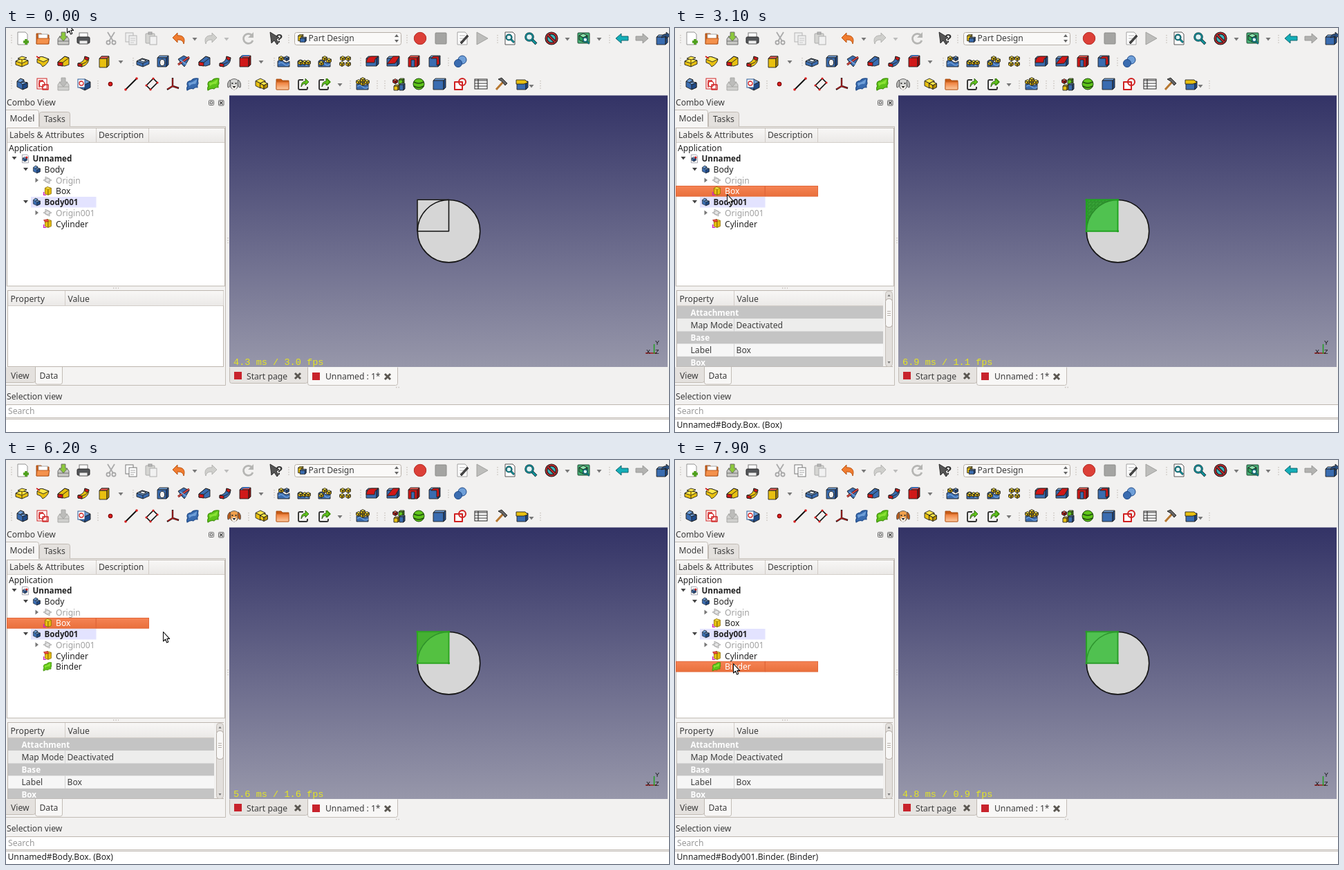
Recreate the animation shown at these times as an HTML page. Size 959 by 584 pixels, loop 8000 ms.

```html
<!DOCTYPE html>
<html lang="en">
<head>
<meta charset="utf-8">
<title>Shape binder</title>
<style>
html, body { margin: 0; width: 100%; height: 100%; overflow: hidden; background: #f2f1f0; }
svg { display: block; width: 959px; height: 584px; }
text { font: 12.15px "Noto Sans", "Open Sans", sans-serif; white-space: pre; }
.b { font-weight: 700; font-size: 11.65px; }
.fps { font: 13.6px "Liberation Mono", monospace; }
.axis { font: 9px "Liberation Sans", sans-serif; }
.q { font: 700 17px "Liberation Sans", sans-serif; }
</style>
</head>
<body>
<svg id="stage" viewBox="0 0 959 584"></svg>
<script>
const YEL = ['#ffe84a', '#e8c010', '#b48f00'];
const BLU = ['#6f9fd8', '#3a6cb0', '#1f4a88'];
const RED = ['#f05a50', '#d01818', '#980808'];
const GRN = ['#8ae234', '#5fc41a', '#3f9208'];
const INK = '#3c3c3c';

const path = (d, fill = 'none', stroke = '#222', w = .9) =>
  `<path d="${d}" fill="${fill}" stroke="${stroke}" stroke-width="${w}" stroke-linejoin="round"/>`;
const rect = (x, y, w, h, fill, stroke = 'none', r = 0) =>
  `<rect x="${x}" y="${y}" width="${w}" height="${h}" rx="${r}" fill="${fill}" stroke="${stroke}"/>`;
const disc = (x, y, r, fill, stroke = 'none', w = 1) =>
  `<circle cx="${x}" cy="${y}" r="${r}" fill="${fill}" stroke="${stroke}" stroke-width="${w}"/>`;
const text = (x, y, s, fill = INK, cls = '') =>
  `<text x="${x}" y="${y}" fill="${fill}" class="${cls}">${s.replace(/&/g, '&amp;')}</text>`;
const at = (x, y, art, k = 1) => `<g transform="translate(${x} ${y}) scale(${k})">${art}</g>`;
const down = (x, y, c = '#777') => path(`M${x - 3.5} ${y - 2}h7l-3.5 4.5z`, c, 'none');
const right = (x, y) => path(`M${x - 2} ${y - 3.5}v7l4.5 -3.5z`, '#777', 'none');
const dots = (x1, y1, x2, y2) =>
  `<path d="M${x1} ${y1}L${x2} ${y2}" stroke="#c2bcb6" stroke-width="1.4" stroke-dasharray="1.3 2.2"/>`;

// Icon pieces, drawn around 0,0
const block = ([a, b, c], x = 0, y = 0, w = 8, h = 8, d = 3) =>
  path(`M${x - w} ${y - h + d}L${x - w + d} ${y - h}H${x + w}L${x + w - d} ${y - h + d}z`, a) +
  path(`M${x - w} ${y - h + d}H${x + w - d}V${y + h}H${x - w}z`, b) +
  path(`M${x + w - d} ${y - h + d}L${x + w} ${y - h}V${y + h - d}L${x + w - d} ${y + h}z`, c);
const cube = ([a, b, c], x = 0, y = 0, r = 8) =>
  path(`M${x - r} ${y - r * .5}L${x} ${y - r}L${x + r} ${y - r * .5}L${x} ${y}z`, a) +
  path(`M${x - r} ${y - r * .5}L${x} ${y}V${y + r}L${x - r} ${y + r * .5}z`, b) +
  path(`M${x + r} ${y - r * .5}L${x} ${y}V${y + r}L${x + r} ${y + r * .5}z`, c);
const body = path('M-7 -4L-2 -8L3 -6V-3L8 -2V5L1 8L-7 4z', BLU[1]) + path('M-7 -4L-2 -8L3 -6L-2 -2z', BLU[0]) +
  path('M-2 -2L3 -3L8 -2L1 1z', BLU[0]) + path('M1 1L8 -2V5L1 8z', BLU[2]);
const slab = (c) => path('M-9 0L-1 -4L9 -1V4L0 8L-9 5z', c[1]) + path('M-9 0L-1 -4L9 -1L0 3z', c[0]) + path('M0 3V8');
const pad = slab(YEL) + path('M-6 -4L0 -7L7 -5L1 -2z', YEL[0]) + path('M0 -2V2', 'none', '#b48f00', 2);
const revolve = path('M-8 -3Q-4 -8 1 -6L9 -3Q8 4 0 8Q-2 3 -8 2z', YEL[1]) + path('M-8 -3Q-4 -8 1 -6L9 -3L1 1z', YEL[0]) +
  path('M-9 -7L-4 -4', 'none', RED[1], 1.6);
const wedge = (c, face) =>
  path('M-8 1L2 -7L8 -5V5L2 7L-8 6z', c[1]) + path('M-8 1L-1 2V7L-8 6z', face[1]) + path('M-1 2L8 -5M-8 1L2 -7L8 -5', 'none');
const sweep = (c, face) => path('M-8 3Q1 2 2 -7L8 -5Q8 5 -2 8L-8 7z', c[1]) + path('M-8 3L-2 4V8L-8 7z', face[1]) +
  path('M2 -7L8 -5L6 -1L2 -3z', face[1]) + path('M-2 4Q5 2 6 -1', 'none');
const page = (fill = '#fff', stroke = '#888') => path('M-7 -9H4L7 -6V9H-7z', fill, stroke);
const cover = 'M-9 -7H-2L0 -5H9V8H-9z';
const folder = path(cover, '#c85a14', '#a34a10') + rect(-6, -6, 13, 8, '#fff', '#aaa') +
  path('M-8 0H10L8 8H-9z', '#f4914c', '#b85518');
const group = path(cover, '#c85a14', '#a34a10') + rect(-9, -3, 18, 11, 'url(#file)', '#c8682a', 1);
const lens = (c = '#0fa0a8') => path('M2 2L8 8', 'none', '#143c44', 4) + path('M2 2L7.5 7.5', 'none', c, 2) +
  disc(-2, -2, 5.3, '#dff4f6', '#143c44', 3) + disc(-2, -2, 5.3, 'none', c, 1.3);
const curl = (c, s) => path('M-9 -1L-2 -8V-4C6 -5 10 0 7 8C6 3 3 2 -2 2V6z', c, s);
const tray = (c, s, arrow) => path('M-8 1L-6 -2H6L8 1V9H-8z', c, s) + path('M-8 4H8', 'none', s) +
  path('M-3 -9H3V-3H6L0 4L-6 -3H-3z', arrow, s);
const arrow = (c, s) => path('M-9 0L-1 -7V-3H9V3H-1V7z', c, s);
const wave = (c) => path('M-9 0Q-5 -4 -1 0T8 0V8H-9z', c[1]) + path('M-8 4Q-4 0 0 4T8 4', 'none', c[0], 1.4);
const bits = (c, ...spots) => spots.map(([x, y]) => cube(c, x, y, 3.4)).join('');
const blob = (c) => path('M-7 -3Q-4 -5 -2 -5Q1 -9 8 -8Q7 -4 8 -1Q6 2 7 5Q3 4 1 7Q-3 5 -8 9Q-9 5 -7 3Q-9 0 -7 -3z', c[1], c[2], 1.2) +
  path('M-6 -2Q-1 -1 6 -7Q6 -3 4 0Q-1 -1 -5 3z', c[0], 'none');
const dog = (c, ear) => path('M-6 -5Q0 -10 6 -5L5 5Q0 11 -5 5z', c, '#555') +
  path('M-6 -6Q-11 -2 -9 5Q-5 5 -5 -2zM6 -6Q11 -2 9 5Q5 5 5 -2z', ear, '#555') +
  path('M-4 4Q0 -1 4 4L2 8H-2z', '#f4f0ea', 'none') +
  disc(-2.5, -1, 1.1, '#222') + disc(2.5, -1, 1.1, '#222') + path('M-2.5 3H2.5L0 6z', '#222', 'none');
const sketch = (c) => rect(-8, -8, 14, 15, '#fff', c) + disc(-1, 0, 4, 'none', c, 1.4) +
  path('M-5 5V-5H1M0 1H8V8H0z', 'none', c, 1.4);
const share = path('M0 -6H-5Q-7 -6 -7 -4V6Q-7 8 -5 8H4Q6 8 6 6V4', 'none', '#333', 1.9) +
  path('M-3 4Q-3 -4 3 -4V-8L8 -3L3 2V-1Q-1 -1 -3 4z', GRN[1], '#2c5c14');
const copy = (on) => [[-8, -8], [-3, -4]].map(([x, y]) => rect(x, y, 11, 13, on ? '#fff' : '#eee', on ? '#777' : '#b5b5b5')).join('') +
  path('M-1 0H6M-1 3H6M-1 6H4', 'none', on ? '#999' : '#c4c4c4');
const origin = path('M-6 0L0 -3L6 0L0 3zM-3 -5L3 -2V5L-3 2z', '#e6e6e6', '#aaa');
const feature = path('M-4 -5L0 -7L6 -5V4L1 6L-4 4z', YEL[1], '#8a6a00') + path('M1 -3V6', 'none', '#5a4600') +
  path('M-6 1V6H-2', 'none', '#d020c0', 1.6) + path('M-4 -5L0 -7L6 -5L1 -3z', YEL[0], '#8a6a00', .7);
const cross = path('M-4 -4L4 4M4 -4L-4 4', 'none', '#5a5650', 3);

const row1 = [
  [24, page() + path('M5 1V9M1 5H9', 'none', '#4ea01c', 3.6)],
  [53, folder],
  [83, tray('#c9c9c5', '#666', '#8cc83c')],
  [112, rect(-6, -8, 12, 8, '#fff', '#777') + rect(-9, -2, 18, 9, '#55575a', '#222', 1.5) + rect(-6, 3, 12, 5, '#eee', '#555')],
  [152, path('M-5 -9L3 4M5 -9L-3 4', 'none', '#aaa', 1.8) + disc(-4, 6, 2.6, 'none', '#a5a5a5', 1.7) + disc(4, 6, 2.6, 'none', '#a5a5a5', 1.7)],
  [210, rect(-8, -7, 13, 14, '#d5d5d2', '#aaa', 1) + rect(-4, -9, 5, 3, '#bbb', '#999') + rect(-2, -3, 10, 12, '#f1f1f1', '#b0b0b0')],
  [250, curl('#f07c30', '#b8500c')],
  [296, `<g transform="scale(-1 1)">${curl('#cfcfcc', '#b0b0ae')}</g>`],
  [350, path('M6 -4A7 7 0 1 0 7 3', 'none', '#b5b5b3', 2.8) + path('M8 -9V-1H0z', '#b5b5b3', 'none')],
  [390, path('M-8 -9L-6 7L-2 3L2 9L4 7L1 1L5 -1z', '#555', '#222') + `<text x="0" y="6" class="q" fill="#333">?</text>`],
  [599, disc(0, 0, 8.7, '#dc4038', '#b52a24')],
  [629, rect(-8, -8, 16, 16, '#a4a4a2', '#8c8c8a', 1)],
  [660, page('#fff', '#999') + path('M-4 -4H4M-4 0H2M-4 4H1', 'none', '#aaa') + path('M-3 6L7 -5L9 -3L-1 8z', '#444', '#222', .7)],
  [688, path('M-7 -9L9 0L-7 9z', '#bdbdbb', '#9c9c9a')],
  [729, page('#fff', '#444') + at(0, 0, lens(), .75)],
  [759, lens()],
  [789, disc(0, 0, 7.6, '#3fb4bc', '#222', 4) + disc(0, 0, 7.6, 'none', '#c8282c', 1.6) + path('M-5 -5L5 5', 'none', '#222', 4) + path('M-5 -5L5 5', 'none', '#c8282c', 1.8)],
  [836, rect(-9, -8, 17, 15, '#49b078', '#1c4830', 1) + cube(['#8be4ac', '#2aa85c', '#177840'], -1, -1, 6) + at(3, 3, lens(), .6)],
  [891, arrow('#14aeb8', '#0b5c66')],
  [920, `<g transform="scale(-1 1)">${arrow('#b2b2b0', '#949492')}</g>`],
  [950, block(BLU, -1, 2, 8, 7) + path('M-2 -1Q0 -7 5 -6V-9L11 -4L5 0V-3z', '#2a4f80')]
];
const row2 = [
  [23, pad],
  [53, revolve],
  [83, wedge(YEL, RED)],
  [112, sweep(YEL, RED)],
  [142, block(YEL, 0, 1, 7, 8) + path('M-7 -4L-4 -7H7L4 -4z', RED[0])],
  [198, slab(BLU) + path('M-5 -1L-1 -3L5 -1L1 1z', '#e8f0fa')],
  [227, block(BLU) + `<ellipse cx="-1" cy="2" rx="3.6" ry="4.8" fill="#f2f1f0" stroke="#222"/>`],
  [257, path('M-8 -3L0 -8L8 -4L1 8L-3 4z', BLU[1]) + path('M-8 5L8 -6', 'none', '#5a0c0c', 3) + path('M-8 5L8 -6', 'none', RED[0], 1.4) + path('M-5 -2L4 5', 'none', BLU[0], 2)],
  [287, wedge(BLU, RED)],
  [317, sweep(BLU, RED)],
  [346, block(RED) + path('M-6 -5L-3 -8H6', 'none', BLU[1], 2)],
  [402, wave(BLU) + bits(YEL, [-4, -4]) + bits(BLU, [4, -4])],
  [431, wave(BLU) + bits(YEL, [-5, 2], [1, 2], [6, 2])],
  [461, wave(BLU) + bits(YEL, [-5, 3], [0, -4], [6, -1])],
  [491, bits(YEL, [-4, -4], [4, -4], [-5, 4], [4, 4])],
  [530, block(BLU, 0, 0, 9, 7) + path('M-9 2Q-8 -7 -1 -7H9Q3 -5 3 2z', RED[1])],
  [560, block(BLU, 0, 0, 9, 7) + path('M-9 4L0 -7H9L3 3z', RED[1])],
  [590, block(RED) + path('M-4 8V-2H1V8z', BLU[1])],
  [620, block(BLU) + path('M-5 -4L-2 -7H6L7 4L3 6V-4z', RED[1])],
  [657, disc(3, -2, 6, BLU[0], BLU[2]) + disc(-3, 3, 5.5, BLU[1], BLU[2])]
];
const row3 = [
  [23, body],
  [53, sketch('#d02020')],
  [83, tray('#d0d0ce', '#a4a4a2', '#bcbcba')],
  [112, cube(BLU, 2, 1, 8) + rect(-8, -7, 10, 12, '#fff', '#2a5a98') + disc(-3, -1, 3, 'none', '#d02020', 1.3)],
  [151, disc(0, 0, 2.9, '#d81c1c', '#600')],
  [181, path('M-8 8L8 -8', 'none', '#111', 2) + disc(-8, 8, 1.8, '#d81c1c') + disc(8, -8, 1.8, '#d81c1c')],
  [211, path('M-8 2L2 -8L8 -2L-2 8z', 'none', '#111', 1.7) + [[-8, 2], [2, -8], [8, -2], [-2, 8]].map(([x, y]) => disc(x, y, 1.6, '#d81c1c')).join('')],
  [241, path('M0 -9V3L-8 8M0 3L9 6', 'none', '#2a1010', 2.4) + path('M0 -8V3L-7 7M0 3L8 6', 'none', '#c82020', 1.2)],
  [270, blob(BLU)],
  [370, cube(YEL, -2, -1, 7) + cube(YEL, 3, 2, 5.5)],
  [400, group],
  [430, share],
  [460, share + path('M4 -8L9 -3L4 2', 'none', '#3f9208', 1.5)],
  [516, wave(BLU) + bits(YEL, [-6, -3], [0, -1], [6, -3], [0, -6])],
  [568, bits(RED, [-5, -4]) + block(GRN, 4, -4, 4, 4, 2) + block(YEL, -3, 5, 4, 4, 2) + block(BLU, 5, 4, 4, 5, 2)],
  [597, disc(0, 0, 8, GRN[1], '#204a10') + path('M-7 -3Q0 1 7 -3M-7 3Q0 7 7 3', 'none', '#204a10', 1.6)],
  [627, block(BLU, 0, 0, 9, 8)],
  [657, rect(-8, -3, 11, 11, '#fff', '#d02020') + path('M-8 -3H3V8H-8z', 'none', '#d02020', 2) + disc(3, -3, 5, 'none', '#d02020', 2)],
  [687, rect(-9, -7, 18, 14, '#fff', '#222') + path('M-9 -5H9M-9 -1H9M-9 3H9M-4 -7V7', 'none', '#333', 1.2)],
  [716, path('M-7 8L3 -3', 'none', '#b87830', 3) + path('M-4 -7L1 -9L9 -1L6 2L1 -4z', '#666', '#222')],
  [747, block(BLU, 0, 2, 8, 6) + path('M-9 -6H4L8 -2L2 0H-9z', YEL[1])]
];

const tab = (x, y, w, h, fill, up) =>
  path(up ? `M${x} ${y + h}V${y + 3}q0 -3 3 -3h${w - 6}q3 0 3 3V${y + h}` : `M${x} ${y}V${y + h - 3}q0 3 3 3h${w - 6}q3 0 3 -3V${y}`, fill, '#bdb6af');

function chrome() {
  const icons = [[row1, 15], [row2, 48], [row3, 81]].map(([row, y]) => row.map(([x, art]) => at(x, y, art)).join('')).join('');
  const grips = [[15, 8, 409, 580, 711, 873], [48, 8, 184, 388, 513, 640], [81, 8, 133, 351, 498, 537, 548, 773]]
    .map(([y, ...xs]) => xs.map(x => dots(x, y - 5, x, y + 7)).join('')).join('');
  const drops = [[273, 16], [812, 16], [858, 16], [166, 49], [369, 49], [483, 82], [760, 84]].map(([x, y]) => down(x, y)).join('');
  return rect(0, 0, 959, 584, '#f2f1f0') + icons + grips + drops + down(319, 16, '#bbb') +
    rect(417.5, 6.5, 154, 18, '#faf9f8', '#b5aea7', 3) + at(428, 15, block(YEL, -2, -1, 4, 5, 2) + block(BLU, 2, 2, 5, 4, 2), .9) +
    text(437.5, 19, 'Part Design') + path('M562 13l3 -4l3 4zM562 17l3 4l3 -4z', '#666', 'none') +
    text(1, 112, 'Combo View') +
    rect(293.5, 104.5, 7, 7, '#f2f1f0', '#666', 1) + rect(295.5, 106.5, 3, 3, 'none', '#666') +
    rect(307.5, 104.5, 7.5, 7.5, '#f2f1f0', '#666', 1) + path('M309 106l4.5 4.5m0 -4.5l-4.5 4.5', 'none', '#444', 1.4) +
    path('M0 142.5H317.5V516.5H0', '#f4f3f2', '#bdb6af') +
    tab(48.5, 121.5, 44, 21, '#e4e1de', true) + tab(-3.5, 118.5, 51, 24.5, '#f6f5f4', true) + rect(0, 142, 47, 2, '#f6f5f4') +
    text(5.5, 135, 'Model') + text(55, 136, 'Tasks') +
    rect(1.5, 144.5, 315, 228.5, '#fff', '#bdb6af') + rect(2, 145, 314, 20, 'url(#head)') +
    path('M2 165.5H316M130.5 145V165M206.5 145V165', 'none', '#cfc9c3') +
    text(5, 159, 'Labels & Attributes') + text(134, 159, 'Description') +
    dots(155, 376, 163, 376) + dots(321, 303, 321, 311) + dots(564, 519.5, 571, 519.5) +
    tab(-3.5, 490.5, 46, 22, '#e4e1de', false) + tab(42.5, 490, 39, 25, '#f8f7f6', false) +
    text(7, 507, 'View') + text(48.5, 507, 'Data') +
    rect(323, 97.5, 634, 392.5, 'url(#sky)') +
    path('M925 470H941', 'none', '#a01818', 1.5) + path('M937.5 457V471', 'none', '#20a020', 1.5) +
    text(939, 458, 'Y', '#111', 'axis') + text(926, 471, 'X', '#111', 'axis') + text(939, 471, 'Z', '#111', 'axis') +
    tab(323.5, 490.5, 113, 23, '#e6e3e0', false) + tab(436.5, 490.5, 130, 26, '#f8f7f6', false) +
    rect(330, 497, 11, 11, '#c8232c') + rect(443, 498, 11, 11, '#c8232c') +
    text(348, 507.5, 'Start page') + text(462, 508, 'Unnamed : 1*') + at(422, 503, cross) + at(552, 504, cross) +
    text(1, 537, 'Selection view') + rect(-.5, 544.5, 970, 19, '#fff', '#bdb6af', 2) + text(3, 558, 'Search', '#999') +
    rect(0, 565, 959, 19, '#fff') + path('M0 565.5H959', 'none', '#bdb6af');
}

function tree(sel, binder) {
  const top = i => 165.6 + 15.7 * i;
  const row = (i, x, label, color = '#222', cls = '') => text(x, top(i) + 12, label, sel === label ? '#fff' : color, cls);
  const selTop = { Box: 228.5, Binder: 291.3 }[sel];
  const edge = '#e2683a';
  return rect(36, 244, 94.5, 15.5, '#e3e3ff') +
    (sel ? rect(1.5, selTop, 128.5, 14.7, 'url(#hot)', edge) + rect(130.5, selTop, 76, 14.7, 'url(#hot)', edge) : '') +
    down(12, 188, '#444') + down(28.5, 204, '#444') + down(28.5, 251, '#444') + right(44.5, 220) + right(44.5, 267) +
    at(28, 189, page('#fff', '#667') + cube(BLU, -1, 1, 5) + disc(3, -3, 2.5, '#d02020'), .65) +
    at(44, 204.5, body, .66) + at(44, 251.5, body, .66) + at(60, 220, origin) + at(60, 267, origin) +
    at(60, 236, feature, .9) + at(60, 283, feature + path('M-6 -6L0 -7L2 -4L-4 -3z', RED[0], '#900', .7), .9) +
    row(0, 4, 'Application') + row(1, 38.5, 'Unnamed', '#222', 'b') + row(2, 55.5, 'Body') +
    row(3, 72, 'Origin', '#a0a0a0') + row(4, 72, 'Box') + row(5, 55.5, 'Body001', '#222', 'b') +
    row(6, 72, 'Origin001', '#a0a0a0') + row(7, 72, 'Cylinder') +
    (binder ? at(60, 298.5, blob(GRN), .72) + row(8, 72, 'Binder') : '');
}

function panel(open) {
  const end = open ? 301 : 314.5;
  const head = (y, s) => rect(3, y, 298, 18.3, '#c4c4c4') + text(22.5, y + 13.5, s, '#fff', 'b');
  const prop = (y, a, b, bg) => rect(3, y, 298, 18.3, bg) + text(22.5, y + 13.5, a) + text(88.5, y + 13.5, b) +
    path(`M85.5 ${y}v18.3`, 'none', '#d0d0d0');
  return rect(2.5, 379.5, 312, 110, '#fff', '#bdb6af') + rect(3, 380, end - 3, 21, 'url(#head)') +
    path(`M3 401.5H${end}M85.5 380V401`, 'none', '#cfc9c3') + text(6.5, 396, 'Property') + text(89.5, 396, 'Value') +
    (open ? `<g clip-path="url(#list)">${head(402, 'Attachment') + prop(420.2, 'Map Mode', 'Deactivated', '#ededec') +
      head(438.4, 'Base') + prop(456.6, 'Label', 'Box', '#f6f6f6') + head(474.8, 'Box')}</g>` +
      rect(301, 380, 14, 109, '#f2f1f0') + rect(304.5, 380.5, 10, 109, '#e2dfdc', '#c4beb8', 4) +
      rect(304.5, 391.5, 10, 41, '#f8f7f6', '#b0a9a2', 4) + path('M307 409.5h5M307 412.5h5M307 415.5h5', 'none', '#b0a9a2') +
      path('M307.5 388l2 -3l2 3zM307.5 482l2 3l2 -3z', '#777', 'none') : '');
}

// outer fill, inner fill, border, arc, disc fill, disc border
const LOOKS = {
  plain: ['#d6d6d6', '#d6d6d6', '#151515', '#151515', '#d6d6d6', '#151515'],
  overDisc: ['#d6d6d6', '#e5e54e', '#151515', '#dedb20', '#e5e54e', '#dedb20'],
  overBox: ['#e4e44c', '#e4e44c', '#e6e01c', '#b2aa3a', '#d6d6d6', '#151515'],
  picked: ['url(#mesh)', '#50c250', '#22a322', '#2b8a2b', '#d6d6d6', '#151515'],
  bound: ['#45b032', '#54c141', '#2ea522', '#2f932b', '#d6d6d6', '#151515'],
  mixed: ['#3fa82f', 'url(#mix)', 'none', '#d8dc20', '#e5e54e', '#e0dc1e'],
  done: ['#50c150', '#50c150', '#2b9c2b', '#2f962f', '#d6d6d6', '#151515']
};
function model(name) {
  const [outer, inner, line, arc, fill, rim] = LOOKS[name];
  const bend = 'M595.3 293.7A45.2 45.2 0 0 1 640.5 248.5';
  const w = line === '#151515' ? 1.6 : 2;
  const corners = w > 1.6 ? [[595, 248.3], [640.5, 248.3], [595, 293.7], [640.5, 293.7]].map(([x, y]) => disc(x, y, 1.6, line)).join('') : '';
  return disc(640.5, 293.7, 45.2, fill, rim, 1.6) + rect(594.6, 247.8, 45.9, 45.9, outer) + path(bend + 'V293.7z', inner, 'none') +
    path(bend, 'none', arc, 1.5) + path('M595 248.3H640.5V293.7H595z', 'none', line, w) + corners;
}

const MOVES = [
  [0, 88, -7], [100, 150, 30], [200, 300, 110], [300, 430, 180], [400, 471, 199], [900, 471, 199],
  [1000, 466, 200], [1200, 400, 209], [1300, 337, 215], [1400, 210, 235], [1500, 90, 262], [1600, 39, 272],
  [1900, 39, 272], [2100, 49, 262], [2400, 72, 240], [3000, 72, 240], [3100, 75, 240], [3600, 75, 240],
  [3700, 82, 236], [3800, 140, 200], [3900, 270, 125], [4000, 354, 90], [4100, 328, 86], [4200, 308, 82],
  [4400, 294, 77], [5200, 294, 77], [5300, 297, 79], [5500, 297, 79], [5800, 288, 135], [6000, 262, 205],
  [6200, 227, 248], [6400, 159, 270], [6700, 115, 279], [7100, 90, 285], [7500, 90, 285], [7600, 88, 286],
  [7800, 84, 294], [8000, 84, 294]
];
const PHASES = [
  [0, 'plain', '4.3 ms / 3.0 fps'], [2200, 'overDisc', '6.3 ms / 0.5 fps'], [2400, 'overBox', '6.3 ms / 0.5 fps'],
  [3100, 'picked', '6.9 ms / 1.1 fps'], [4800, 'bound', '5.6 ms / 1.6 fps'], [6700, 'mixed', '7.4 ms / 0.7 fps'],
  [7800, 'bound', '7.4 ms / 0.7 fps'], [7900, 'done', '4.8 ms / 0.9 fps']
];

function pointer(t) {
  const i = MOVES.findIndex(m => m[0] > t);
  const [t0, x0, y0] = MOVES[i - 1], [t1, x1, y1] = MOVES[i];
  const k = (t - t0) / (t1 - t0);
  return [x0 + (x1 - x0) * k, y0 + (y1 - y0) * k];
}

function button(x, px, py, pressed) {
  const over = Math.abs(px - x) < 14 && py > 67 && py < 95;
  return over ? rect(x - 13, 67.5, 26, 27, pressed ? '#dcd8d4' : '#fbfaf9', '#c4bdb6', 3) : '';
}

function draw(t) {
  const [x, y] = pointer(t);
  const [, look, fps] = PHASES.filter(p => p[0] <= t).pop();
  const sel = t >= 7900 ? 'Binder' : t >= 3100 ? 'Box' : '';
  const ready = t >= 3200;
  const note = { Box: 'Unnamed#Body.Box. (Box)', Binder: 'Unnamed#Body001.Binder. (Binder)' }[sel];
  return at(181, 15, copy(ready)) +
    button(300, x, y, t === 4700) + at(300, 81, blob(GRN)) +
    button(330, x, y) + at(330, 81, ready ? dog('#f0a04c', '#b85a18') : dog('#d6d6d4', '#b4b4b2')) +
    tree(sel, t >= 4800) + panel(t >= 3100) + model(look) + text(329, 487, fps, '#e6e622', 'fps') +
    (note ? text(2.5, 578, note, '#222') : '') +
    at(x, y, path('M.5 .5V14L3.6 11.2L5.6 16L7.8 15L5.8 10.4H9.6z', '#fff', '#111', 1.1));
}

const fade = (id, a, b) => `<linearGradient id="${id}" x2="0" y2="1"><stop stop-color="${a}"/><stop offset="1" stop-color="${b}"/></linearGradient>`;
const fleck = (id, base, a, b) => `<pattern id="${id}" width="5" height="5" patternUnits="userSpaceOnUse">` +
  rect(0, 0, 5, 5, base) + rect(1, 0, 1, 1, a) + rect(3, 2, 1, 1, a) + rect(0, 3, 1, 1, b) + rect(4, 4, 1, 1, b) + '</pattern>';

const stage = document.getElementById('stage');
stage.innerHTML = '<defs>' + fade('sky', '#333366', '#9797aa') + fade('head', '#f8f7f6', '#ebe9e7') + fade('hot', '#f58354', '#e9703c') +
  fade('file', '#ee7a34', '#fbc9a0') + fleck('mesh', '#319a31', '#2a862a', '#3fae3f') + fleck('mix', '#ccd835', '#e6b83c', '#a0d838') +
  '<clipPath id="list">' + rect(3, 402, 298, 87.5, '#000') + '</clipPath></defs>' + chrome() + '<g id="live"></g>';
const live = document.getElementById('live');

let shown = -1;
function tick() {
  const t = Math.floor(performance.now() % 8000 / 100) * 100;
  if (t !== shown) live.innerHTML = draw(shown = t);
  requestAnimationFrame(tick);
}
tick();
</script>
</body>
</html>
```
